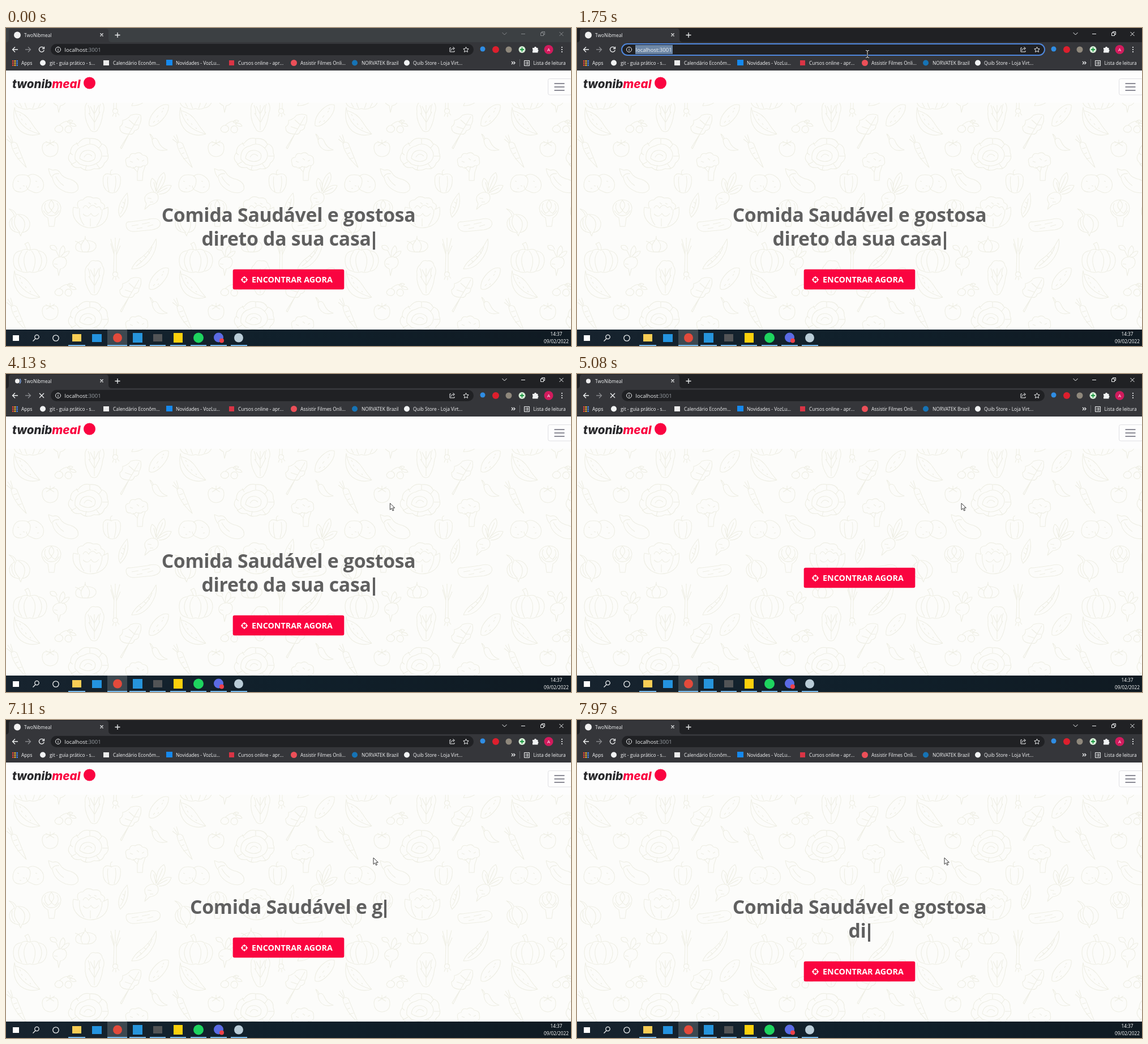
Recreate the animation shown at these times as an HTML page. Size 998 px wide and 561 px high, loop 8000 ms.

```html
<!DOCTYPE html>
<html lang="pt-BR">
<head>
<meta charset="utf-8">
<title>TwoNibmeal</title>
<style>
  html, body { margin: 0; width: 100%; height: 100%; overflow: hidden; background: #fdfdfd; }
  body { position: relative; font-family: "Open Sans", "Noto Sans", sans-serif; }
  svg { position: absolute; left: 0; top: 0; width: 998px; height: 561px; display: block; }
  text { white-space: pre; }
  #headline {
    position: absolute; left: 199px; top: 308px; width: 600px;
    font-size: 33.8px; font-weight: 700; line-height: 42px; letter-spacing: -.3px;
    text-align: center; white-space: pre; color: #606060;
  }
  #caret {
    display: inline-block; width: 4px; height: 32px; margin: 0 1px 0 3px;
    vertical-align: -7px; background: #606060;
  }
  .line { fill: none; stroke: #f1f3f4; stroke-width: 1.3; }
  .thin { fill: none; stroke: #f1f3f4; stroke-width: 1; }
  .marks text { font-size: 8.4px; fill: #f6f7f8; }
  .clock { font-size: 8.3px; fill: #fff; text-anchor: middle; }
  .brand { font: italic 800 20.5px Inter, sans-serif; }
</style>
</head>
<body>
<svg viewBox="0 0 998 561">
  <defs>
    <clipPath id="hero"><rect y="132" width="998" height="400"/></clipPath>
    <linearGradient id="bar">
      <stop offset="0" stop-color="#17232e"/><stop offset=".5" stop-color="#10202b"/><stop offset="1" stop-color="#101a22"/>
    </linearGradient>
    <g id="veg" fill="none" stroke="#eeeee4" stroke-width="1.100" stroke-linejoin="round">
      <!-- melon, olives, romaine, spinach -->
      <path d="M15 140Q20 178 60 187Q42 193 26 182Q10 168 15 140ZM17 146Q34 150 44 166Q50 176 60 187M27 160l2 3M34 168l2 3M42 176l2 2M24 152l2 3"/>
      <path d="M86 178q4-9 12-5q6 6-2 11q-9 1-10-6M104 180q1-9 9-7q6 5 1 11q-7 3-10-4M94 172q10-10 20-7M108 166q4-6 10-2q-4 5-10 2M112 169q9-3 12 4q-8 2-12-4"/>
      <path d="M150 181q-12-18-10-34q-2-12 6-18q4-9 12-6q10-2 12 8q6 8 1 20q-2 18-10 30q-5 4-11 0ZM156 180V136M156 166l-10-16M157 166l9-18M156 152l-7-14M157 150l7-14M145 136q4 8 3 16M167 134q-4 8-2 16"/>
      <path d="M202 211l15-24q-17 0-16-13q6-3 5-11q9-2 14-9q11-4 18 0q2 10-3 18q0 8-8 9q-2 8-10 6l-13 26ZM217 187l18-31M222 178l-12-4M226 170l-9-8M226 171l8 0"/>
      <!-- cucumber, chili, carrot, tomato -->
      <path d="M253 172q-2-14 12-28q13-12 22-8q2 12-12 27q-14 14-22 9ZM260 167l3-3M266 158l3-4M275 149l2-3M268 165l2-2M277 143l2-2"/>
      <path d="M254 187q4 2 6 8q6-2 9 5q5 12 16 15q-16 4-23-6q-4-6-4-13ZM260 195l-2 3"/>
      <path d="M3 190l8 12M8 188l4 13M1 196l9 7M9 204q5-5 10 0l17 42q-24-22-27-42ZM13 213l7-2M17 222l5-2M20 231l8-2"/>
      <path d="M78 203q-14-5-14 9q1 14 14 15q14-1 14-15q0-14-14-9ZM78 204l-8-4M78 204l-7 4M78 204l7 4M78 204l8-5M78 204v-7"/>
      <!-- cabbage, broccoli -->
      <path d="M115 238q-9-8-1-18q0-14 14-17q8-11 20-8q16-1 20 9q12 3 11 16q5 11-5 18q-4 13-18 10q-14 7-24-2q-14 2-17-8ZM122 232q-2-20 16-24q14-8 26 4q10 12 0 24q-16 12-34 4ZM130 230q2-16 18-14q14 4 8 16q-12 8-26-2ZM138 228q6-10 14-2M118 224l-5-4M128 208l-4-6M148 204v-9M164 212l6-8M170 226l10 0M160 240l6 8M142 242l-2 9M124 236l-9 5"/>
      <path d="M212 238q-3-9 6-10q2-9 10-6q8-5 13 2q10 1 9 9q3 10-8 10q-5 5-12 1q-6 6-10 1q-8 1-8-7ZM224 245l8 9v15h9l1-14l4-12M232 254l3-10M219 235l5 2M231 230l4 3M240 235l4-2"/>
      <!-- potatoes, eggplant, pepper, beet -->
      <path d="M12 276q2-18 17-17q14-1 14 12q-2 16-14 18q-17 2-17-13ZM38 262q8-8 20 0q12 9 7 22q-8 11-20 4q-9-3-9-10M20 270l3 1M30 278l3 1M52 270l3 1M55 281l3-1M24 283l3 0"/>
      <path d="M75 248l8 3q8-3 13 5q4 8 18 11q16 6 13 18q-6 9-22 4q-20-8-23-25q-5-4-7-16ZM82 262q2-6 12-5M88 262q5 10 14 16"/>
      <path d="M172 262q4-8 14-3q12-5 16 4q2 16-7 26q-8 4-14 0q-12-6-9-27ZM186 260q-4-8 2-10M180 262q-2 14 2 27M193 261q3 14-2 28"/>
      <path d="M256 290q13-2 13 10q-1 10-15 12l-9 8l3-10q-9-14 8-20ZM262 290q-11-14-4-25q10 5 7 24q0-26 14-34q8 12-12 35q14-16 25-12q-5 15-22 15M261 272l4 16M277 262l-11 26M285 282l-18 9M250 300l7 1M254 307l6 0"/>
      <!-- pods, artichoke, cauliflower -->
      <path d="M214 291q6 26-12 43q-10-18 12-43ZM211 301q-2 18-9 27M206 307l4 3M203 315l4 3"/>
      <path d="M63 318q2-14 17-15q16 1 17 15q-1 12-10 17l-2 15h-9l-2-15q-10-5-11-17ZM80 304q-8 9 0 17q9-8 0-17M70 309q-5 9 4 18q8-4 6-7M90 309q6 9-3 18q-8-4-6-7M66 322q6 10 14 9q9 1 14-9"/>
      <path d="M119 316l9 2q-6-14 8-15q7-9 18-3q13-2 14 8q10 4 4 12l8-4q3 24-15 33q-18 8-34-2q-16-12-12-31ZM130 318q-2 18 8 30M170 320q0 16-10 29M136 318q4-9 10 0q6-10 14-1q6-5 8 4M136 328q8 8 14-1q6 10 14 0M146 308l4 3M156 309l4 2M149 336v14"/>
      <!-- onion, zucchini, garlic -->
      <path d="M5 319q10 2 13 10q19-2 24 14q1 16-14 18l-2 6l-3-6q-18-2-17-18q2-8 9-11q-2-8-10-13ZM18 330q-9 16 7 31M22 330q18 10 7 31M11 336q-3 12 5 21"/>
      <path d="M212 347q0-6 8-5l30-4q18-5 22 4q3 11-14 14l-30 3q-15 1-16-12ZM222 349l12-2M240 346l14-3M231 354l10-2M250 350l10-3"/>
      <path d="M140 367q-1 8 5 8q16 2 14 12q-4 9-18 8q-18 1-18-8q-1-9 14-12q3-2 3-8ZM138 375q-10 10-2 20M143 375q9 10 1 20M122 376q8 2 11 8"/>
      <!-- pumpkin, turnip, leek, long pod -->
      <path d="M38 392q-2-9-5-11l6-3q4 6 4 14M42 392q10-4 15 1q15 2 15 18q-2 17-15 18q-8 4-15 1q-8 3-16-1q-13-2-13-19q0-16 14-17q7-5 15-1ZM38 393q-12 14-1 37M45 393q12 14 2 37M28 394q-12 16 0 34M57 394q12 16 0 34"/>
      <path d="M94 404q13-2 13 10q-2 10-11 11l-3 12l-2-12q-10-4-8-13q3-7 11-8ZM94 404l-6-12q-11 0-10-8q10-3 12 7M95 404q-2-14 6-20q8 8-4 19q8-11 15-9q-2 9-13 11M85 416l6 1"/>
      <path d="M190 432l1-38l-6-22M195 432v-38l6-23M193 394v-24M191 400l-6-20M195 400l7-16M189 432q4-4 8 0q2 6-4 7q-6-1-4-7M190 439l-2 5M194 440v5M197 438l3 4"/>
      <path d="M265 372q3 16-9 34q-14 20-34 19q4-10 13-17q18-12 30-36ZM258 386q-6 18-28 34M251 394l3 4M244 402l4 3M236 410l4 3"/>
    </g>
  </defs>

  <!-- page -->
  <rect y="74" width="998" height="58" fill="#fdfdfd"/>
  <rect y="132" width="998" height="400" fill="#fcfcfa"/>
  <g id="pattern" clip-path="url(#hero)"></g>
  <text class="brand" x="11" y="106" fill="#29292c">twonib<tspan fill="#fa0440">meal</tspan></text>
  <circle cx="147.500" cy="97" r="10.500" fill="#fa0440"/>
  <rect x="957.500" y="89.500" width="42" height="28.500" rx="3" fill="#fdfdfd" stroke="#e0e0e4"/>
  <path d="M968.500 98h18M968.500 104h18M968.500 110h18" stroke="#666673" stroke-width="1.400"/>
  <g id="button">
    <rect x="400.700" y="-.300" width="196.600" height="35.600" rx="3" fill="#fa0440"/>
    <g fill="none" stroke="#fff" stroke-width="1.600">
      <circle cx="421" cy="18" r="4.200"/><path d="M421 12v4M421 20v4M415 18h4M423 18h4"/>
    </g>
    <text x="434" y="23" font-size="14.300" font-weight="700" fill="#fff">ENCONTRAR AGORA</text>
  </g>

  <!-- browser -->
  <rect id="strip" width="998" height="26"/>
  <path d="M0 25.500Q5 25 5 19V6Q5 1 10 1H176Q181 1 181 6V19Q181 25 187 25H998V75H0Z" fill="#35363a"/>
  <g id="favicon" fill="#f1f1f1"><circle cx="20" cy="12.500" r="6"/></g>
  <path id="spin" d="M20 6.500a6 6 0 0 1 6 6" fill="none" stroke="#8ab4f8" stroke-width="1.400"/>
  <text x="32" y="15.500" font-size="8.300" fill="#f1f3f4">TwoNibmeal</text>
  <path class="line" d="M166.500 9.500l5 5m0-5l-5 5M192.500 12.500h9M197 8v9"/>
  <path id="controls" class="thin" d="M876.500 8l4 4l4-4M910 10.500h7M944.500 8.500h5v5h-5zM946.500 8.500v-2h5v5h-2M977.500 7l7 7m0-7l-7 7"/>
  <g class="line">
    <path d="M21 38H12M16 33.500L11.500 38l4.500 4.500"/>
    <path d="M34 38h9M39 33.500l4.500 4.500l-4.500 4.500" style="stroke: #85878b"/>
    <path id="reload" d="M66.500 35a4.500 4.500 0 1 0 .800 4M67.500 33v3.500H64"/>
    <path id="stop" d="M59 34l8 8m0-8l-8 8"/>
  </g>
  <rect id="omnibox" x="79" y="28" width="747" height="20" rx="10" fill="#202124" stroke="#4f87dc"/>
  <circle class="thin" cx="92" cy="38" r="4.500"/><path class="thin" d="M92 37v3.500M92 35v1"/>
  <rect id="selection" x="103" y="30" width="66" height="16" fill="#6d87a6"/>
  <text x="103.500" y="41.500" font-size="9.500" fill="#f1f3f4">localhost<tspan id="port">:3001</tspan></text>
  <path class="thin" d="M786 35h-2v7h8v-2M786 40q0-4 5-4M789.500 33.500l3 2.500l-3 2.500M812.500 33.500l1.400 3l3.300.400l-2.400 2.200l.600 3.300l-2.900-1.600l-2.900 1.600l.600-3.300l-2.400-2.200l3.300-.400z"/>
  <circle cx="842" cy="37" r="4.500" fill="#2f8de4"/>
  <circle cx="865" cy="38" r="6" fill="#dd1f2d"/>
  <circle cx="888" cy="38" r="5.500" fill="#8f887c"/>
  <circle cx="911.500" cy="38" r="6" fill="#d9efd9"/><path d="M908 38h7M911.500 34.500v7" stroke="#209a45" stroke-width="2"/>
  <path d="M930 35h3a2 2 0 0 1 4 0h2.500v3a2 2 0 0 1 0 3.500v2H930v-3a2 2 0 0 0 0-3z" fill="#f1f3f4"/>
  <circle cx="958.500" cy="38" r="8" fill="#d21b5d"/>
  <text x="958.500" y="41" font-size="8" fill="#fff" text-anchor="middle">A</text>
  <g fill="#f1f3f4"><circle cx="982" cy="34" r="1.100"/><circle cx="982" cy="38" r="1.100"/><circle cx="982" cy="42" r="1.100"/></g>
  <g class="marks">
    <g id="apps"></g>
    <circle cx="65" cy="61.500" r="5" fill="#f1f3f4"/>
    <rect x="172" y="57" width="10" height="9" fill="#ececec"/>
    <rect x="283" y="56" width="11" height="10" fill="#1689ee"/>
    <rect x="394" y="57" width="9" height="9" fill="#d93445"/>
    <circle cx="508.500" cy="61.500" r="5.500" fill="#ec4f58"/>
    <circle cx="616" cy="61.500" r="5" fill="#1673b5"/>
    <circle cx="708" cy="61.500" r="5" fill="#f1f3f4"/>
    <text x="27" y="64.500">Apps</text>
    <text x="77" y="64.500">git - guia prático - s...</text>
    <text x="189" y="64.500">Calendário Econôm...</text>
    <text x="300" y="64.500">Novidades - VozLu...</text>
    <text x="410" y="64.500">Cursos online - apr...</text>
    <text x="520" y="64.500">Assistir Filmes Onli...</text>
    <text x="628" y="64.500">NORVATEK Brazil</text>
    <text x="719" y="64.500">Quib Store - Loja Virt...</text>
    <text x="931.500" y="64.500">Lista de leitura</text>
    <path class="line" d="M893 59l2.500 2.500l-2.500 2.500M896.500 59l2.500 2.500l-2.500 2.500"/>
    <path d="M907.500 55v13" stroke="#606266"/>
    <path class="thin" d="M915.500 57.500h9v9h-9zM917 60h1M919 60h4M917 62h1M919 62h4M917 64h1M919 64h4"/>
  </g>

  <!-- taskbar -->
  <rect y="532" width="998" height="29" fill="url(#bar)"/>
  <rect x="179" y="532" width="35" height="29" fill="#3d4850"/>
  <rect x="12" y="542" width="11" height="10" fill="#fff"/>
  <g class="line"><circle cx="54.500" cy="545" r="3.700"/><path d="M52 548l-4.500 4.500"/><circle cx="88" cy="547" r="5.200"/></g>
  <rect x="117" y="540" width="16" height="13" fill="#f8cd55"/>
  <rect x="152" y="540" width="17" height="14" fill="#2493df"/>
  <circle cx="197" cy="546.500" r="8" fill="#e34a3b"/>
  <rect x="224" y="538" width="17" height="17" fill="#2694db"/>
  <rect x="260" y="540" width="16" height="13" fill="#525456"/>
  <rect x="296" y="538" width="16" height="17" fill="#fbd00c"/>
  <circle cx="340" cy="546.500" r="9" fill="#1ed45f"/>
  <circle cx="375.500" cy="546" r="8.500" fill="#5b6be4"/><circle cx="381" cy="551.500" r="4" fill="#ee4148"/>
  <circle cx="411" cy="546.500" r="8" fill="#b9ccd7"/>
  <path d="M110 560h30M179 560h35M218 560h29M254 560h28M290 560h28M326 560h28M361 560h29M397 560h29" stroke="#76b9ed" stroke-width="2"/>
  <text class="clock" x="972" y="542.500">14:37</text>
  <text class="clock" x="972" y="556">09/02/2022</text>
</svg>

<div id="headline"><span id="typed"></span><span id="caret"></span></div>

<svg viewBox="0 0 998 561">
  <path id="arrow" d="M0 0V11.500L2.700 9L4.600 13.200L6.500 12.400L4.700 8.200H8.300Z" fill="#fff" stroke="#222" stroke-width=".900"/>
  <g id="beam" fill="none">
    <path d="M-3-6.500q3 0 3 1.500q0-1.500 3-1.500M0-5V5M-3 6.500q3 0 3-1.500q0 1.500 3 1.500" stroke="#111" stroke-width="2.600"/>
    <path d="M-3-6.500q3 0 3 1.500q0-1.500 3-1.500M0-5V5M-3 6.500q3 0 3-1.500q0 1.500 3 1.500" stroke="#fff"/>
  </g>
</svg>

<script>
const LOOP = 8000;
const PHRASE = "Comida Saudável e gostosa\ndireto da sua casa";
const FOCUS = 1500, RELOAD = 2900, RENDER = 4500, MOUNT = 5095, LOADED = 5300;
const TYPE_START = 5080, CHAR_MS = 102.6;

// Pointer stops: time, x, y; movement between stops is eased.
const PATH = [
  [900, 1004, 300], [1400, 513, 46], [2400, 513, 46], [3050, 678, 228],
  [4000, 678, 228], [4300, 679, 228], [6350, 679, 228], [6900, 649, 243], [LOOP, 649, 243]
];

const $ = id => document.getElementById(id);
const show = (id, on) => { $(id).style.display = on ? "" : "none"; };
const place = (id, x, y) => $(id).setAttribute("transform", `translate(${x} ${y})`);

let copies = "";
for (let row = -1; row < 2; row++)
  for (let col = 0; col < 4; col++)
    copies += `<use href="#veg" x="${col * 293}" y="${row * 288}"/>`;
$("pattern").innerHTML = copies;

const hues = ["#e8453c", "#f9bb2d", "#4688f1", "#3aa757"];
$("apps").innerHTML = Array.from({ length: 9 }, (_, i) => {
  const col = i % 3, row = Math.floor(i / 3);
  return `<rect x="${11 + col * 3.7}" y="${57 + row * 3.7}" width="2.5" height="2.5" fill="${hues[(i + row) % 4]}"/>`;
}).join("");

function pointerAt(t) {
  const i = PATH.findIndex(p => p[0] > t);
  if (i < 1) return null;
  const [t0, x0, y0] = PATH[i - 1], [t1, x1, y1] = PATH[i];
  const k = (t - t0) / (t1 - t0), e = k * k * (3 - 2 * k);
  return [x0 + (x1 - x0) * e, y0 + (y1 - y0) * e];
}

function draw(t) {
  const active = t >= FOCUS;
  const editing = active && t < RELOAD;
  const loading = t >= RELOAD && t < LOADED;

  $("strip").setAttribute("fill", active ? "#202124" : "#3c4043");
  $("controls").style.opacity = active ? 1 : .4;
  $("omnibox").setAttribute("stroke-width", editing ? 2 : 0);
  $("port").setAttribute("fill", editing ? "#f1f3f4" : "#9aa0a6");
  show("selection", editing);
  show("reload", !loading);
  show("stop", loading);
  show("spin", loading && t < RENDER);
  $("spin").setAttribute("transform", `rotate(${t * .36 % 360} 20 12.5)`);
  $("favicon").setAttribute("transform", loading ? "translate(6.67 4.17) scale(.667)" : "");

  const count = t < RENDER ? PHRASE.length : Math.max(0, Math.floor((t - TYPE_START) / CHAR_MS));
  const text = PHRASE.slice(0, count);
  const mounted = t < RENDER || t >= MOUNT;
  show("headline", mounted);
  if ($("typed").textContent !== text) $("typed").textContent = text;
  place("button", 0, 342 + 42 * (mounted ? text.split("\n").length : 0));

  const spot = pointerAt(t);
  const overUrl = spot && spot[1] < 50;
  show("arrow", spot && !overUrl);
  show("beam", overUrl);
  if (spot) place(overUrl ? "beam" : "arrow", ...spot);
}

function tick() {
  draw(performance.now() % LOOP);
  requestAnimationFrame(tick);
}
tick();
</script>
</body>
</html>
```
